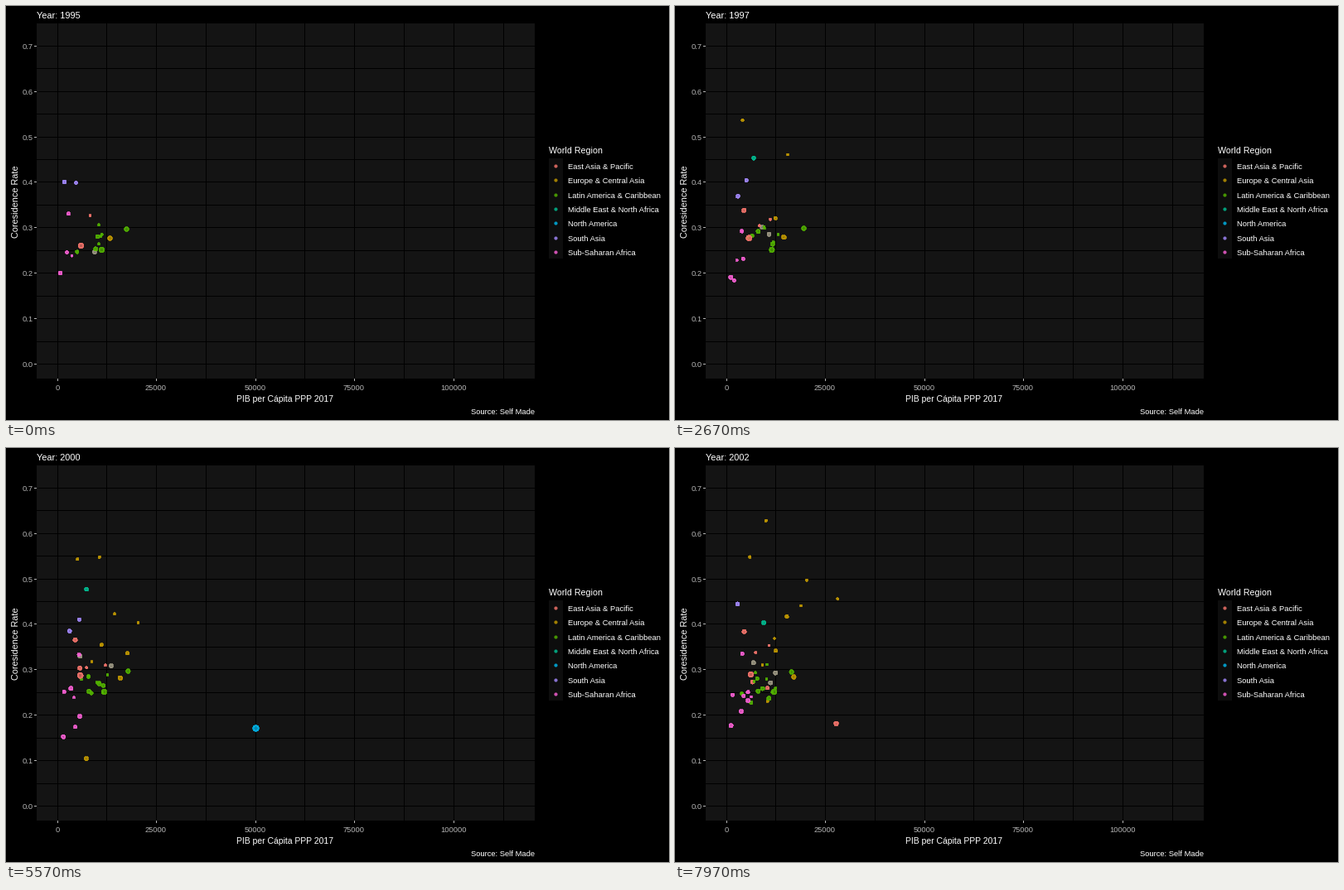
A matplotlib script that plays this animation: 800x500 px, repeating every 8 s.

```python
import numpy as np
import matplotlib.pyplot as plt
from matplotlib.animation import FuncAnimation
from matplotlib.colors import to_rgb
from matplotlib.patches import Rectangle

W, H, DPI = 800, 500, 100
FRAMES, YEAR = 240, 30          # frames per loop, frames per year
YEARS = FRAMES // YEAR
PT = 72 / DPI
GREY = "#B3B3B3"

plt.rcParams["font.family"] = "Liberation Sans"
rng = np.random.default_rng(11)

REGIONS = {
    "P": ("East Asia & Pacific", "#F8766D"),
    "E": ("Europe & Central Asia", "#C49A00"),
    "L": ("Latin America & Caribbean", "#53B400"),
    "M": ("Middle East & North Africa", "#00C094"),
    "B": ("North America", "#00B6EB"),
    "S": ("South Asia", "#A58AFF"),
    "A": ("Sub-Saharan Africa", "#FB61D7"),
}
COLOR = {k: (*to_rgb(c), 0.75) for k, (_, c) in REGIONS.items()}
COLOR["N"] = (*to_rgb("#A09A86"), 0.75)     # blend of two regions

dots = []       # (region, radius, years, xs, ys)


def path(region, radius, *keys):
    """A dot that runs straight between (year, x, y) keys."""
    dots.append((region, radius, *np.array(keys, float).T))


def crowd(region, start, end, center, spread):
    """Dots that drift to a new place each year, more of them over time."""
    count = np.round(np.linspace(start, end, YEARS))
    for j in range(end):
        born = int(np.argmax(count > j))
        years = np.arange(born, YEARS + 1)
        dev = np.clip(rng.normal(size=(len(years), 2)), -1.6, 1.6)
        for k in range(1, len(dev)):
            dev[k] = 0.7 * dev[k - 1] + 0.7 * dev[k]
        xs, ys = (np.array(center) + dev.clip(-1.7, 1.7) * spread).T
        dots.append((region, rng.choice([1.3, 2, 2, 2.4]), years, xs, ys))


crowd("N", 1, 3, (106, 275), (12, 16))
crowd("E", 0, 7, (125, 225), (20, 48))
crowd("P", 1, 4, (100, 262), (16, 20))
crowd("L", 7, 12, (104, 284), (14, 14))
crowd("A", 2, 6, (80, 295), (8, 28))

path("B", 3.6, (5, 301, 338), (6, 301, 338))
path("M", 2.3, (2, 94, 186), (6, 97, 168), (8, 107, 212))
path("S", 2, (0, 84, 213), (7, 89, 205))
path("S", 2.3, (0, 70, 212), (1.6, 77, 207), (3.6, 74, 250), (6.3, 77, 209),
     (8, 75, 187))
path("S", 4.7, (3, 83, 240), (4, 83, 233))
path("E", 2.6, (0, 125, 280), (8, 143, 276))
path("E", 1.5, (1, 108, 258), (2, 80, 138), (8, 90, 131))
path("E", 1.5, (3, 103, 104), (5.5, 113, 131), (6.3, 96, 142), (8, 110, 85))
path("E", 2.4, (5, 90, 428), (6, 102, 328))
path("N", 1.3, (6, 281, 331), (7, 160, 292))
path("E", 1.3, (7, 150, 205), (8, 199, 180))
path("P", 3.3, (0, 90, 289), (4, 88, 275), (8, 91, 273))
path("P", 2.5, (1, 81, 265), (3, 83, 242), (8, 83, 221))
path("P", 2.6, (6, 254, 427), (7, 166, 337), (8, 196, 332))
path("L", 3.1, (0, 115, 294), (8, 119, 294))
path("L", 2.6, (0, 145, 269), (2.6, 155, 268), (8, 140, 270))
path("A", 2.4, (0, 65, 322), (3, 67, 328), (6, 69, 352), (8, 67, 334))
path("A", 2, (0, 73, 297), (2.6, 71, 332), (3.9, 70, 291), (8, 69, 298))


def area(radius):
    return (2 * (np.asarray(radius) - 0.4) * PT) ** 2


fig = plt.figure(figsize=(W / DPI, H / DPI), dpi=DPI, facecolor="black")
ax = fig.add_axes([0, 0, 1, 1])
ax.set_xlim(0, W)
ax.set_ylim(H, 0)
ax.axis("off")


def box(x0, y0, x1, y1, color):
    ax.add_patch(Rectangle((x0, y0), x1 - x0, y1 - y0, fc=color, lw=0,
                           antialiased=False, zorder=0))


def text(x, y, s, px, color="white", va="baseline", **kw):
    return ax.text(x, y, s, fontsize=px * PT, color=color, va=va, **kw)


box(37, 21, 638, 450, "#141414")
for k in range(10):
    x = int(62 + k * 59.78)
    box(x, 21, x + 1, 450, "black")
    if k % 2 == 0:
        box(x, 450, x + 1, 453, GREY)
        text(x, 464, str(k * 12500), 9.3, GREY, ha="center")
for k in range(15):
    y = int(432.55 - k * 27.45)
    box(37, y, 638, y + 1, "black")
    if k % 2 == 0:
        box(34, y, 37, y + 1, GREY)
        text(32.5, y + 4, f"{k / 20:.1f}", 9.3, GREY, ha="right")

title = text(37, 15, "", 11)
text(336.5, 478, "PIB per Cápita PPP 2017", 10.4, ha="center")
text(17.5, 236.5, "Coresidence Rate", 10.9, ha="right", va="center",
     rotation=90)
text(638, 493, "Source: Self Made", 9.4, ha="right")

text(655, 178, "World Region", 10.6)
box(655, 184, 672, 305, "#0D0D0D")
for k, (key, (name, _)) in enumerate(REGIONS.items()):
    y = 193 + k * 17.3
    ax.scatter([663], [y], s=area(2), color=[COLOR[key]], lw=PT,
               antialiased=False)
    text(678, round(y + 4), name, 9.4)

cloud = ax.scatter([], [], lw=PT, zorder=3, antialiased=False)


def draw(i):
    t = max(i - 1, 0) / YEAR
    live = [d for d in dots if d[2][0] <= t < d[2][-1]]
    cloud.set_offsets([(np.interp(t, d[2], d[3]) + 0.5,
                        np.interp(t, d[2], d[4]) + 0.5) for d in live])
    cloud.set_sizes(area([d[1] for d in live]))
    colors = [COLOR[d[0]] for d in live]
    cloud.set_facecolor(colors)
    cloud.set_edgecolor(colors)
    title.set_text(f"Year: {1995 + int(t)}")
    return cloud, title


anim = FuncAnimation(fig, draw, frames=FRAMES, interval=8000 / FRAMES,
                     repeat=True, repeat_delay=0, blit=False)
plt.show()
```
